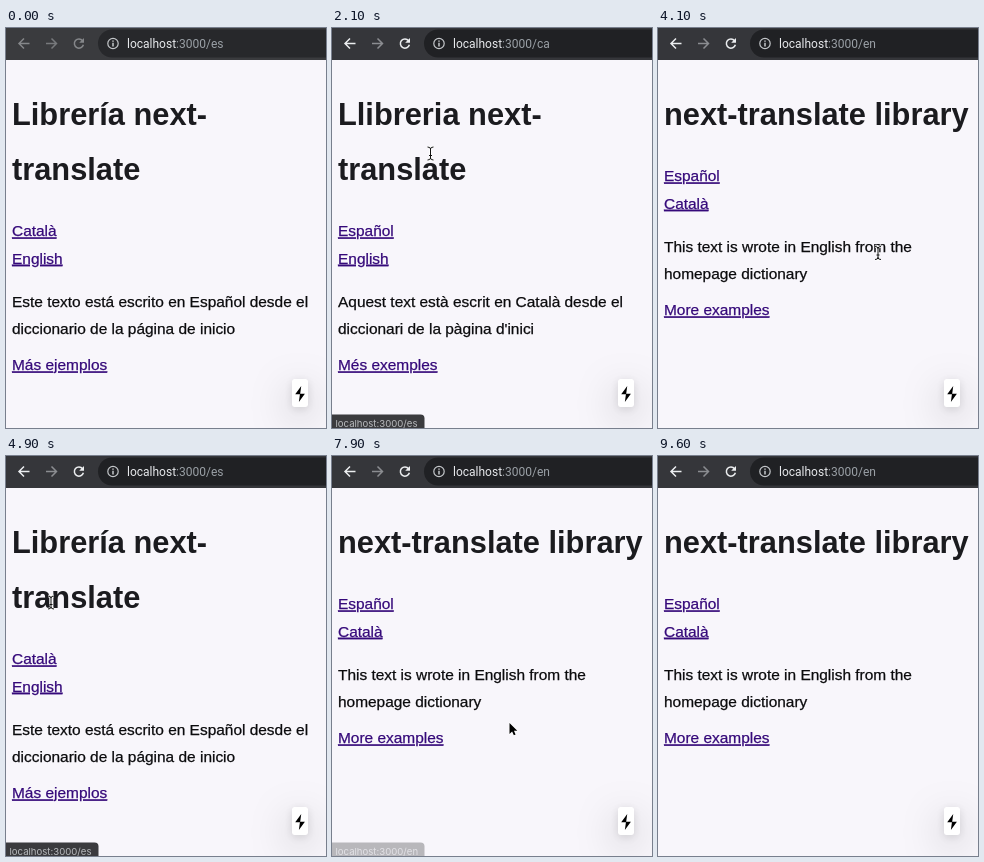
An HTML page that plays this animation: 320 px wide and 400 px high, repeating every 9800 ms.

```html
<!DOCTYPE html>
<html lang="en">
<head>
<meta charset="utf-8">
<style>
  html, body { margin: 0; width: 100%; height: 100%; overflow: hidden; background: #f8f6fb; }
  svg { display: block; width: 320px; height: 400px; font: 15.45px "Liberation Sans", Arial, sans-serif; }
  .title { font-size: 30.8px; font-weight: bold; fill: #1b1b1f; }
  .body { fill: #0b0b0d; stroke: #0b0b0d; stroke-width: .25; }
  .link { fill: #35097a; stroke: #35097a; stroke-width: .25; text-decoration: underline; }
  .link.active { fill: #e0000f; stroke: #e0000f; }
  .line { fill: none; stroke: currentColor; stroke-width: 1.5; }
  #bar { --bar: #3a3b3e; --pill: #27282b; --icon: #85878a; --dim: #77797c; }
  #bar.focused { --bar: #35363a; --pill: #202124; --icon: #eceef0; --dim: #8b8d91; }
  #bar text { font: 12px Roboto, sans-serif; }
  #statusText { font: 9.6px Inter, sans-serif; }
  #box { fill: #fff; filter: drop-shadow(0 2px 5px #0000001f) drop-shadow(0 11px 19px #00000040); }
</style>
</head>
<body>
<svg viewBox="0 0 320 400">
  <defs>
    <path id="beam" d="M-3-6.500Q0-6.500 0-4.500Q0-6.500 3-6.500M0-5V5M-3 6.500Q0 6.500 0 4.500Q0 6.500 3 6.500M-1.500 2H1.500"/>
  </defs>
  <rect width="320" height="400" fill="#f8f6fb"/>
  <g id="pages"></g>

  <g id="bar">
    <rect width="320" height="32" fill="var(--bar)"/>
    <g transform="translate(0 -.5)">
      <rect x="92" y="2" width="260" height="28" rx="14" fill="var(--pill)"/>
      <path class="line" color="var(--icon)" d="M23.500 16H13M18 11L13 16L18 21"/>
      <path class="line" color="var(--dim)" d="M40 16H50.500M45.500 11L50.500 16L45.500 21"/>
      <path class="line" color="var(--icon)" d="M76.600 13.200A4.600 4.600 0 1 0 77.400 17.300"/>
      <path fill="var(--icon)" d="M78 10.500V15.300H73.200Z"/>
      <g color="#c4c7ca">
        <circle class="line" cx="107" cy="16" r="5.2" style="stroke-width:1.2"/>
        <path class="line" d="M107 15.300V19M107 13V14.300"/>
      </g>
      <text x="121" y="20.5" fill="#e8eaed">localhost<tspan id="path" fill="#9aa0a6"></tspan></text>
    </g>
  </g>

  <g id="status">
    <path id="statusBox" fill="#3b3b3e"/>
    <text id="statusText" x="3.5" y="398.8" fill="#b9bbbe"></text>
  </g>

  <g id="badge">
    <rect id="box" y="351" height="28" rx="3"/>
    <path id="bolt" d="M36 3L30.740 41H8ZM25 77L30.260 39H53Z"/>
    <g id="label">
      <text class="body" x="200" y="369.7" font-size="11.6">Prerendered Page</text>
      <circle cx="303" cy="352" r="6" fill="#fff"/>
      <path class="line" d="M300.500 349.500L305.500 354.500M305.500 349.500L300.500 354.500" style="stroke-width:1.1"/>
    </g>
  </g>

  <g id="cursor" stroke-linejoin="round">
    <path id="arrow" transform="scale(.87)" d="M0 0V12.500L3 9.800L5 14.200L7 13.300L5.100 9H9Z" stroke="#fff" stroke-width="1.6" paint-order="stroke"/>
    <g id="ibeam" fill="none">
      <use href="#beam" stroke="#fff" stroke-width="2.4"/>
      <use href="#beam" stroke="#111"/>
    </g>
    <g id="hand" stroke="#111" stroke-width=".9">
      <path fill="#fff" d="M-2.500 7V0A1.400 1.400 0 0 1 .3 0V4.500L1.200 4L2.700 4.600L3.300 5.100L4.800 5.300L5.400 6L6.800 6.600V10L5.600 14H-.5L-5 8.600C-5.600 7.200-4 6.400-3.200 7.200Z"/>
      <path d="M.8 9V12M2.700 9V12M4.500 9V12" stroke-width=".7"/>
    </g>
  </g>
</svg>
<script>
const LOOP = 9800, STEP = 100;
const $ = id => document.getElementById(id);

const pages = {
  es: { title: ["Librería next-", "translate"], links: ["Català", "English"], more: "Más ejemplos",
        body: ["Este texto está escrito en Español desde el", "diccionario de la página de inicio"] },
  ca: { title: ["Llibreria next-", "translate"], links: ["Español", "English"], more: "Més exemples",
        body: ["Aquest text està escrit en Català desde el", "diccionari de la pàgina d'inici"] },
  en: { title: ["next-translate library"], links: ["Español", "Català"], more: "More examples",
        body: ["This text is wrote in English from the", "homepage dictionary"] }
};

const visits = [[0, "es"], [1400, "ca"], [3300, "en"], [4800, "es"], [7500, "en"]];
const presses = [[1200, 1400, 0], [3200, 3300, 1], [4700, 4800, 0], [7400, 7500, 1]]; // from, to, link index
const docs = "https://nextjs.org/d...";
const statuses = [
  [1800, 2500, "localhost:3000/es"], [4800, 5500, "localhost:3000/es"], [6200, 7100, docs],
  [7400, 8000, "localhost:3000/en"], [8800, 9400, docs]
];
// time, x, y, shape until the next stop
const stops = [
  [100, 243, 24, "arrow"], [300, 235, 97, "arrow"], [400, 235, 97, "arrow"], [600, 182, 225, "arrow"],
  [700, 182, 225, "arrow"], [1000, 38, 204, "hand"], [1800, 38, 204, "arrow"], [2100, 98.5, 125.5, "ibeam"],
  [2400, 98.5, 125.5, "arrow"], [2900, 48, 231, "hand"], [3400, 48, 231, "arrow"], [4000, 220, 225, "ibeam"],
  [4200, 220, 225, "arrow"], [4600, 45, 146.5, "hand"], [4800, 45, 146.5, "ibeam"], [5200, 45, 146.5, "arrow"],
  [5700, 170, 245, "arrow"], [6100, 290, 364, "hand"], [6600, 290, 364, "arrow"], [6800, 205.5, 336, "arrow"],
  [7300, 40, 231, "hand"], [7600, 40, 231, "arrow"], [7900, 177.5, 267, "arrow"], [8000, 177.5, 267, "arrow"],
  [8300, 290, 364, "hand"], [9000, 290, 364, "arrow"], [9400, 235, 402, "arrow"]
];

const line = (cls, y, text) => `<text class="${cls}" x="6" y="${y}">${text}</text>`;
function pageMarkup(name) {
  const p = pages[name], first = 97.3, top = first + 55 * (p.title.length - 1);
  return `<g id="${name}">` +
    p.title.map((s, i) => line("title", first + 55 * i, s)).join("") +
    p.links.map((s, i) => line("link", top + 56 + 27.4 * i, s)).join("") +
    p.body.map((s, i) => line("body", top + 126.5 + 27.4 * i, s)).join("") +
    line("link", top + 190, p.more) + "</g>";
}
$("pages").innerHTML = Object.keys(pages).map(pageMarkup).join("");

const clamp = v => Math.max(0, Math.min(1, v));
const smooth = v => v * v * (3 - 2 * v);
const ramp = (t, from, to) => smooth(clamp((t - from) / (to - from)));
const show = (id, on) => $(id).style.display = on ? "" : "none";

function drawPage(t) {
  const current = visits.findLast(v => t >= v[0])[1];
  const press = presses.find(p => t >= p[0] && t < p[1]);
  for (const name in pages) show(name, name === current);
  $(current).querySelectorAll(".link").forEach((el, i) =>
    el.classList.toggle("active", !!press && press[2] === i));
  $("bar").classList.toggle("focused", t >= 1200);
  $("path").textContent = ":3000/" + current;
}

function drawStatus(t) {
  const status = statuses.find(s => t >= s[0] && t < s[1]);
  show("status", status);
  if (!status) return;
  const right = status[2] === docs ? 106 : 92.5;
  $("status").style.opacity = clamp((status[1] - t) / 300);
  $("statusText").textContent = status[2];
  $("statusBox").setAttribute("d", `M0 386.500H${right - 4}q4 0 4 4V400H0Z`);
}

function drawBadge(t) {
  const open = ramp(t, 6100, 6300) - ramp(t, 6900, 7100) + ramp(t, 8300, 8500) - ramp(t, 9200, 9400);
  const left = 286 - 103 * open;
  $("box").setAttribute("x", left);
  $("box").setAttribute("width", 302 - left);
  $("bolt").setAttribute("transform", `translate(${left + 1.5} 357.4) scale(.215)`);
  $("label").style.opacity = clamp(open * 3 - 2);
}

function drawCursor(t) {
  const i = stops.findLastIndex(s => t >= s[0]);
  const a = stops[i], b = stops[i + 1];
  show("cursor", a && b);
  if (!a || !b) return;
  const k = ramp(t, a[0], b[0]);
  const x = a[1] + (b[1] - a[1]) * k, y = a[2] + (b[2] - a[2]) * k;
  $("cursor").setAttribute("transform", `translate(${x} ${y})`);
  for (const shape of ["arrow", "ibeam", "hand"]) show(shape, shape === a[3]);
}

function frame() {
  const t = Math.floor(performance.now() % LOOP / STEP) * STEP;
  drawPage(t);
  drawStatus(t);
  drawBadge(t);
  drawCursor(t);
  requestAnimationFrame(frame);
}
frame();
</script>
</body>
</html>
```
